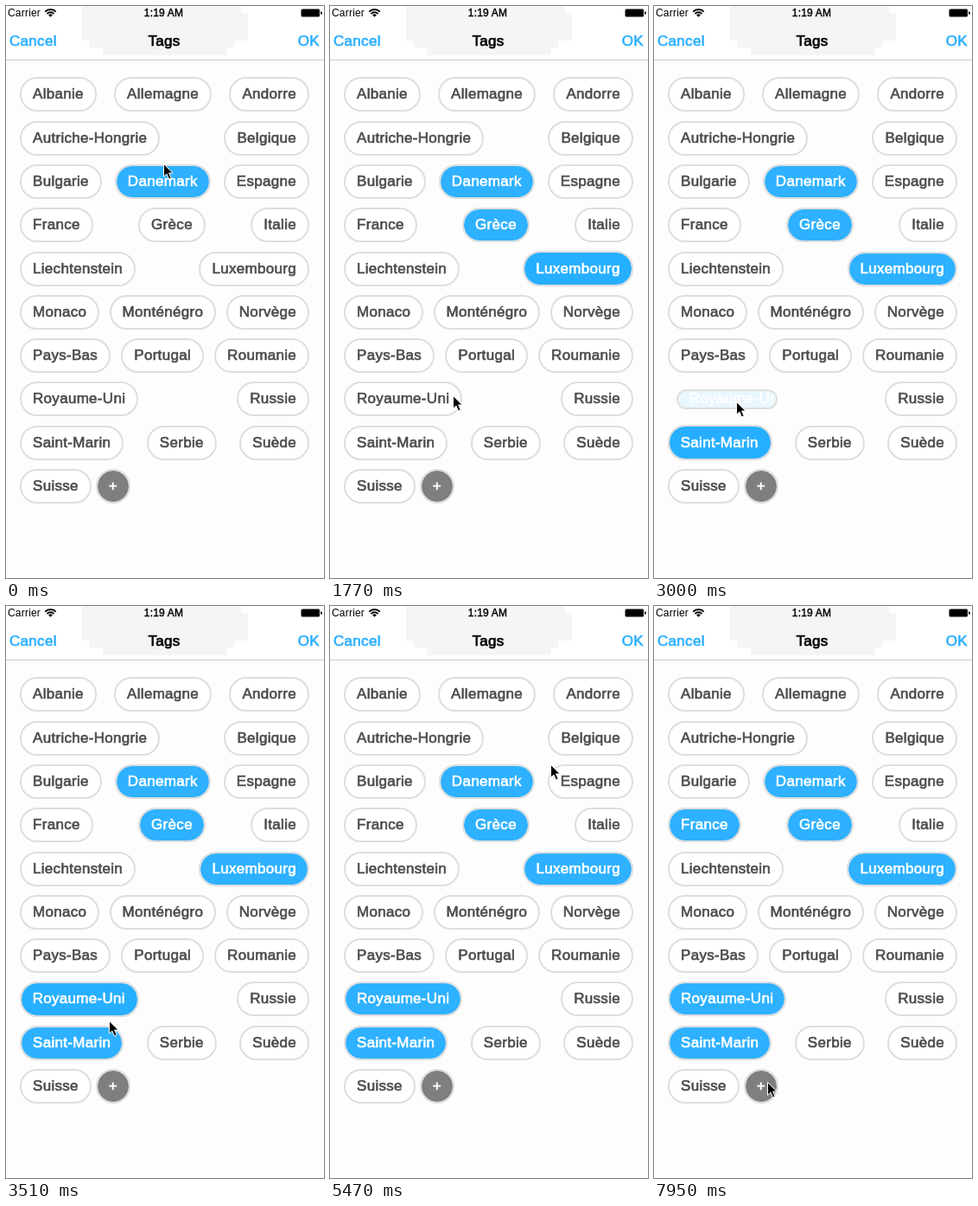
An HTML page that plays this animation: 368x661 px, repeating every 8000 ms.

```html
<!DOCTYPE html>
<html lang="fr">
<head>
<meta charset="utf-8">
<title>Tags</title>
<style>
  html, body { margin: 0; width: 100%; height: 100%; overflow: hidden; background: #fdfdfd; }
  #stage {
    position: relative; width: 368px; height: 661px; overflow: hidden;
    font: 17px/20px "Liberation Sans", Arial, sans-serif;
    letter-spacing: .3px; -webkit-text-stroke: .65px currentColor;
  }
  #stage > * { position: absolute; }
  .bar { left: 0; top: 0; width: 368px; height: 62px; background: #fff; border-bottom: 1px solid #cbcbcb; }
  .nav { top: 31px; color: #2cafff; }
  .title { left: 0; width: 366px; text-align: center; color: #000; }
  .status { top: -2px; font-size: 12px; letter-spacing: .2px; color: #000; -webkit-text-stroke-width: 0; }
  .time { left: 0; width: 365px; text-align: center; -webkit-text-stroke-width: .4px; }
  #tags { left: 16px; top: 82.4px; width: 335px; }
  .row { display: flex; justify-content: space-between; height: 40px; margin-bottom: 10.3px; }
  .row:last-child { justify-content: flex-start; gap: 5px; }
  .pill {
    box-sizing: border-box; flex: none; display: flex; align-items: center;
    height: 40px; padding: 0 13px; overflow: hidden; white-space: nowrap;
    border: 2px solid #dedede; border-radius: 20px;
    background: #fff padding-box; color: #4c4c4f;
  }
  .add { width: 40px; padding: 0; justify-content: center; background-color: #7f7f7f; color: #fff; }
  svg { left: 0; top: 0; overflow: visible; }
</style>
</head>
<body>
<div id="stage">
  <div class="bar"></div>
  <svg width="368" height="62">
    <path fill="#f5f5f5" d="M88 0H272V8H280V40H264V48H256V57H112V48H96V40H88Z"/>
    <g fill="none" stroke="#000" stroke-width="1.9">
      <path d="M45.3 6.7A8.4 8.4 0 0 1 57.7 6.7"/>
      <path d="M47.5 9A5.4 5.4 0 0 1 55.5 9"/>
    </g>
    <path d="M51.5 12.7L49.2 10.4A3.2 3.2 0 0 1 53.8 10.4Z"/>
    <rect x="341.5" y="3.5" width="21.5" height="9" rx="1.5"/>
    <path d="M364 6.2Q366 6.5 366 8T364 9.8Z"/>
  </svg>
  <div class="status" style="left:2px">Carrier</div>
  <div class="status time">1:19 AM</div>
  <div class="nav" style="left:4px">Cancel</div>
  <div class="nav title">Tags</div>
  <div class="nav" style="right:5px">OK</div>
  <div id="tags"></div>
  <svg id="cursor" width="13" height="20">
    <path d="M.5 .5V15.2L3.9 12L6.5 17.9L9.2 16.7L6.6 11H11.2Z"
      stroke="#fff" stroke-linejoin="round"/>
  </svg>
</div>
<script>
const LOOP = 8000;
const rows = [
  'Albanie Allemagne Andorre', 'Autriche-Hongrie Belgique', 'Bulgarie Danemark Espagne',
  'France Grèce Italie', 'Liechtenstein Luxembourg', 'Monaco Monténégro Norvège',
  'Pays-Bas Portugal Roumanie', 'Royaume-Uni Russie', 'Saint-Marin Serbie Suède', 'Suisse +'
];

// When each tag is tapped
const taps = {
  'Danemark': -2000, 'Grèce': 590, 'Luxembourg': 1260,
  'Saint-Marin': 2470, 'Royaume-Uni': 2988, 'France': 6960
};

// Cursor moves: departure, arrival, x, y
const moves = [
  [0, 0, 183, 182], [60, 400, 191, 250], [600, 960, 266, 303], [1500, 1770, 143, 450],
  [2010, 2290, 98, 498], [2600, 2860, 96, 457], [3280, 3570, 121, 480], [3750, 4210, 85, 235],
  [4450, 4600, 112, 146], [4600, 4750, 151, 171], [5050, 5470, 256, 183],
  [6420, 6770, 55, 253], [7200, 7710, 137, 551], [7900, 7950, 132, 550]
];

const mix = (a, b, p) => a + (b - a) * p;
const clamp = p => Math.min(1, Math.max(0, p));
const easeOut = p => 1 - (1 - p) ** 2;
// Damped swing from 1 to 0
const spring = ms => Math.exp(-.0065 * ms) * Math.cos(Math.PI * ms / 180);

function make(className, parent, text = '') {
  const el = document.createElement('div');
  el.className = className;
  el.textContent = text;
  parent.append(el);
  return el;
}

const live = [];
for (const names of rows) {
  const row = make('row', document.getElementById('tags'));
  for (const name of names.split(' ')) {
    const el = make(name === '+' ? 'pill add' : 'pill', row, name);
    if (name in taps) live.push({ el, tap: taps[name], width: el.getBoundingClientRect().width });
  }
}

function drawTag({ el, tap, width }, t) {
  const on = t >= tap;
  const swing = on ? spring(t - tap) : 0;
  const dx = 11 * swing, dy = 10 * swing;
  const fill = on ? 1 - swing : 0;
  el.style.margin = `${dy}px ${dx}px`;
  el.style.width = width - 2 * dx + 'px';
  el.style.height = 40 - 2 * dy + 'px';
  el.style.backgroundColor = `rgb(${mix(255, 46, fill)}, ${mix(255, 177, fill)}, 255)`;
  el.style.color = on ? '#fff' : '';
}

const cursor = document.getElementById('cursor');
function drawCursor(t) {
  let x = 0, y = 0;
  for (const [from, to, toX, toY] of moves) {
    const p = to > from ? easeOut(clamp((t - from) / (to - from))) : 1;
    x = mix(x, toX, p);
    y = mix(y, toY, p);
  }
  cursor.style.transform = `translate(${x - 1}px, ${y}px)`;
}

const start = performance.now();
function tick() {
  const t = (performance.now() - start) % LOOP;
  live.forEach(tag => drawTag(tag, t));
  drawCursor(t);
  requestAnimationFrame(tick);
}
tick();
</script>
</body>
</html>
```
